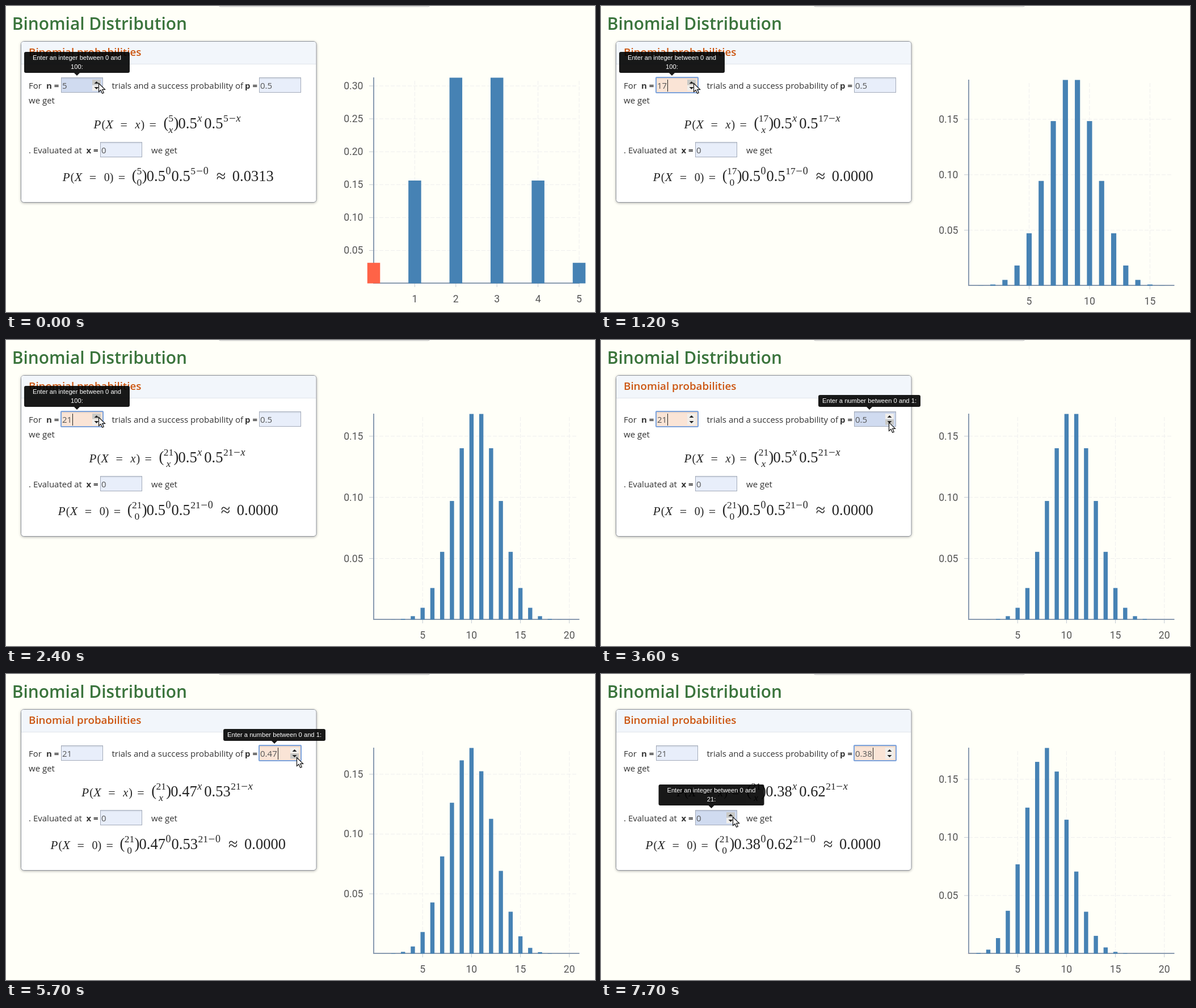
An HTML page for the animation above (8000 ms loop, 1038 by 540 pixels).

```html
<!DOCTYPE html>
<html lang="en">
<head>
<meta charset="utf-8">
<title>Binomial Distribution</title>
<style>
  html, body { margin: 0; width: 100%; height: 100%; overflow: hidden; background: #fffff8; }
  svg { display: block; width: 1038px; height: 540px; }
  text { font: 15px "Open Sans", sans-serif; fill: #333; white-space: pre; }
  .bold { font-weight: 700; }
  .title { font-size: 29.9px; font-weight: 600; fill: #3a743c; }
  .heading { font-size: 18.75px; font-weight: 600; fill: #cc5510; }
  .value { font-weight: 500; fill: #555; }
  .math { font-family: "Liberation Serif", serif; fill: #222; }
  .tick { font: 17.6px Roboto, sans-serif; fill: #555; }
  .tip { font: 11.2px "Liberation Sans", sans-serif; fill: #fff; text-anchor: middle; }
  .grid { stroke: #eee; stroke-dasharray: 7 3; }
  .mark { stroke: #c3cad2; }
  .axis { stroke: #8a9bb0; stroke-width: 2; fill: none; }
</style>
</head>
<body>
<svg viewBox="0 0 1038 540">
  <defs>
    <filter id="shadow" x="-5%" y="-5%" width="110%" height="112%">
      <feDropShadow dx="0" dy="1" stdDeviation="2" flood-opacity=".3"/>
    </filter>
  </defs>
  <rect x="375" y="-10" width="372" height="11" rx="3" fill="#f6f6f6" stroke="#bbb"/>
  <text class="title" x="10.7" y="42">Binomial Distribution</text>
  <rect x="26.5" y="62.5" width="520.5" height="284" rx="5" fill="#fff" stroke="#8e929a" filter="url(#shadow)"/>
  <path d="M27 102V67a4 4 0 0 1 4-4H542a4 4 0 0 1 4 4V102Z" fill="#f2f6fb"/>
  <path d="M27 102.5H546" stroke="#e0e5ec"/>
  <text class="heading" x="40" y="88">Binomial probabilities</text>
  <text x="40" y="146">For</text>
  <text class="bold" x="71" y="146">n =</text>
  <text x="186.5" y="146">trials and a success probability of</text>
  <text class="bold" x="421" y="146">p =</text>
  <text x="40" y="172">we get</text>
  <text x="40" y="260">. Evaluated at</text>
  <text class="bold" x="141.5" y="260">x =</text>
  <text x="256" y="260">we get</text>
  <g id="scene"></g>
</svg>
<script>
const LOOP = 8000, TICK = 100, FADE = 300;
const scene = document.getElementById('scene');
const clamp = (v, lo, hi) => Math.min(hi, Math.max(lo, v));

const fields = { n: { x: 97, y: 126 }, p: { x: 446, y: 126 }, x: { x: 166, y: 240 } };
// Pointer glides: start, end, target position
const glides = [[2400, 3500, 507, 145], [3900, 4400, 508, 152], [4800, 5200, 512, 147],
  [6400, 6800, 743, 359], [6800, 7000, 251, 313], [7100, 7600, 232, 252]];
// Each tooltip is open during the given spans
const tips = [
  { x: 125, y: 81, w: 186, lines: ['Enter an integer between 0 and', '100:'], spans: [[-FADE, 2400]] },
  { x: 473, y: 97, w: 180, lines: ['Enter a number between 0 and 1:'], spans: [[3200, 4000], [4800, 6500]] },
  { x: 194.5, y: 195, w: 186, lines: ['Enter an integer between 0 and', '21:'], spans: [[7100, LOOP]] }
];

// Single clicks on the spinner plus one long press of five ticks
const presses = (t, clicks, hold, rate) =>
  clicks.filter(c => c <= t).length + Math.round(rate * clamp((t - hold) / TICK + 1, 0, 5));

function pointerAt(t) {
  let x = 163, y = 136;
  for (const [start, end, tx, ty] of glides) {
    const k = clamp((t - start) / (end - start), 0, 1);
    x += (tx - x) * k;
    y += (ty - y) * k;
  }
  return { x, y };
}

const inside = (f, m) => m.x >= f.x && m.x < f.x + 74 && m.y >= f.y && m.y < f.y + 27;

const text = (x, y, s, cls = '', style = '') => `<text x="${x}" y="${y}" class="${cls}" style="${style}">${s}</text>`;
const rect = (x, y, w, h, fill, extra = '') => `<rect x="${x}" y="${y}" width="${w}" height="${h}" fill="${fill}" ${extra}/>`;
const path = (d, attrs = '') => `<path d="${d}" ${attrs}/>`;
const math = (x, y, s, size, italic, anchor = 'start') =>
  text(x, y, s, 'math', `font-size:${size}px;text-anchor:${anchor};font-style:${italic ? 'italic' : 'normal'}`);

function formula(y, v, n, p, result) {
  const it = v === 'x', q = +(1 - p).toFixed(2), digits = String(n).length;
  const big = 26.5, small = 17.5;
  const width = s => big / 2 * String(s).length - 6;
  let x = 0, out = '';
  const put = (s, size, advance, dy = 0, italic = false) => {
    out += math(x, y + dy, s, size, italic);
    x += advance;
  };
  const power = s => put(s, 18, it ? 12 : 10, -12, it);
  put('P', 21, 14, 0, true);
  put('(', 20, 7);
  put('X', 22, 26, 0, true);
  put('=', 22, 26, 1);
  put(v, 20, 10, 0, it);
  put(')', 20, 15);
  put('=', 22, it ? 25 : 24, 1);
  const stack = 4 + 8 * digits;
  put('(', big, 7, -1);
  out += math(x + stack / 2, y - 12, n, small, false, 'middle') + math(x + stack / 2, y + 7.5, v, small, it, 'middle');
  x += stack - 1;
  put(')', big, 8, -1);
  put(p, big, width(p));
  power(v);
  put(q, big, width(q));
  put(n, small, 8 * digits + 2, -12);
  put('−', 21, 12.5, -11);
  power(v);
  if (result) {
    x += 13;
    put('≈', 30, 28, 1);
    put(result, big, width(result));
  }
  return `<g transform="translate(${286 - x / 2})">${out}</g>`;
}

function field({ x, y }, value, focused, caret, mouse) {
  const hover = inside({ x, y }, mouse), label = String(value);
  let out = focused
    ? rect(x, y, 74, 27, '#fae4d6', 'rx="1" stroke="#7ba2dc" stroke-width="2"')
    : rect(x + .5, y + .5, 73, 26, hover ? '#d0dbf0' : '#e8eefa', 'stroke="#a3abba"');
  out += rect(x + 1, y + 1, 72, 2, '#000', 'opacity=".06"') + text(x + 2, y + 20, label, 'value');
  if (caret) out += rect(Math.round(x + 3 + label.length * 8.56 - (label.includes('.') ? 4.6 : 0)), y + 4, 1, 21, '#222');
  if (focused || hover) {
    for (const down of [0, 1]) {
      const over = hover && !mouse.beam && down === +(mouse.y >= y + 14);
      out += rect(x + 55, y + 4 + 10 * down, 15, 9.5, over ? '#c9c9c6' : '#f1efec');
      out += path(`M${x + 58.5} ${y + 11 + 6 * down}h8l-4 ${down ? 4 : -4}z`, 'fill="#222"');
    }
  }
  return out;
}

function chart(n, p) {
  const base = n === 5 ? 489 : 493, height = 363, left = 648, width = 362, top = base - height;
  const probs = [(1 - p) ** n];
  for (let k = 1; k <= n; k++) probs[k] = probs[k - 1] * (n - k + 1) / k * p / (1 - p);
  const max = Math.max(...probs);
  const px = k => left + width * k / n, py = v => base + .5 - height * v / max;
  const step = n / 5 >= 3.16 ? 5 : n / 5 >= 1.41 ? 2 : 1;
  const bar = Math.min(22.5, .43 * width / n);
  let out = '';
  for (let v = .05; v < max; v += .05) {
    const y = py(v);
    out += path(`M${left} ${y}H1006`, 'class="grid"') + path(`M640 ${y}H${left}`, 'class="mark"');
    out += text(629.5, y + 6, v.toFixed(2), 'tick', 'text-anchor:end');
  }
  for (let k = step; k <= n; k += step) {
    out += path(`M${px(k)} ${base}V${top + 4}`, 'class="grid"') + path(`M${px(k)} ${base}v7`, 'class="mark"');
    out += text(px(k), base + 34, k, 'tick', 'text-anchor:middle');
  }
  out += path(`M${left} ${top}V${base}H1010.5`, 'class="axis"');
  probs.forEach((v, k) => {
    out += rect(px(k) - bar / 2, py(v), bar, base - py(v) + .5, k ? '#4682b4' : '#ff6347');
  });
  return out;
}

function tooltip({ x, y, w, lines, spans }, t) {
  const alpha = Math.max(...spans.map(([on, off]) => clamp(Math.min(t - on, off + FADE - t) / FADE, 0, 1)));
  const h = 5 + 16 * lines.length;
  return `<g opacity="${alpha}"><g opacity=".9">${rect(x - w / 2, y, w, h, '#000', 'rx="3"')}` +
    path(`M${x - 5} ${y + h}h10l-5 5z`) + '</g>' +
    lines.map((s, i) => text(x, y + 14 + 16 * i, s, 'tip')).join('') + '</g>';
}

function cursor({ x, y, beam }) {
  const bar = 'M-3-7.5H-1L0-6.5 1-7.5H3M0-6.5V6.5M-3 7.5H-1L0 6.5 1 7.5H3';
  return `<g transform="translate(${x} ${y})">` + (beam
    ? path(bar, 'fill="none" stroke="#fff" stroke-width="3.5"') + path(bar, 'fill="none" stroke="#111" stroke-width="1.6"')
    : path('M.5.5V15.5L4 12.3 6.6 18.3 9.3 17.1 6.7 11.3H11.5Z', 'fill="#fff" stroke="#111" stroke-width="1.2"')) + '</g>';
}

function draw(t) {
  const n = 5 + presses(t, [600, 1700, 1900, 2200, 2400], 800, 2.2);
  const p = (50 - presses(t, [3700, 3900, 5500, 5800], 6000, 1.6)) / 100;
  const active = t >= 5000 ? 'p' : t >= 600 && t < 3700 ? 'n' : '';
  const idle = t - (active === 'n' ? 2400 : 6400);
  const caretOn = idle < 0 || idle % 1200 < 600;
  const mouse = pointerAt(t);
  mouse.beam = Object.values(fields).some(f => inside(f, mouse) && mouse.y > f.y + 24);
  const values = { n, p, x: 0 };
  scene.innerHTML = chart(n, p) +
    formula(216, 'x', n, p) + formula(309, '0', n, p, ((1 - p) ** n).toFixed(4)) +
    Object.keys(fields).map(k => field(fields[k], values[k], active === k, active === k && caretOn, mouse)).join('') +
    tips.map(tip => tooltip(tip, t)).join('') + cursor(mouse);
}

let shown = -1;
function frame() {
  const t = Math.floor(performance.now() % LOOP / TICK) * TICK;
  if (t !== shown) draw(shown = t);
  requestAnimationFrame(frame);
}
frame();
</script>
</body>
</html>
```
